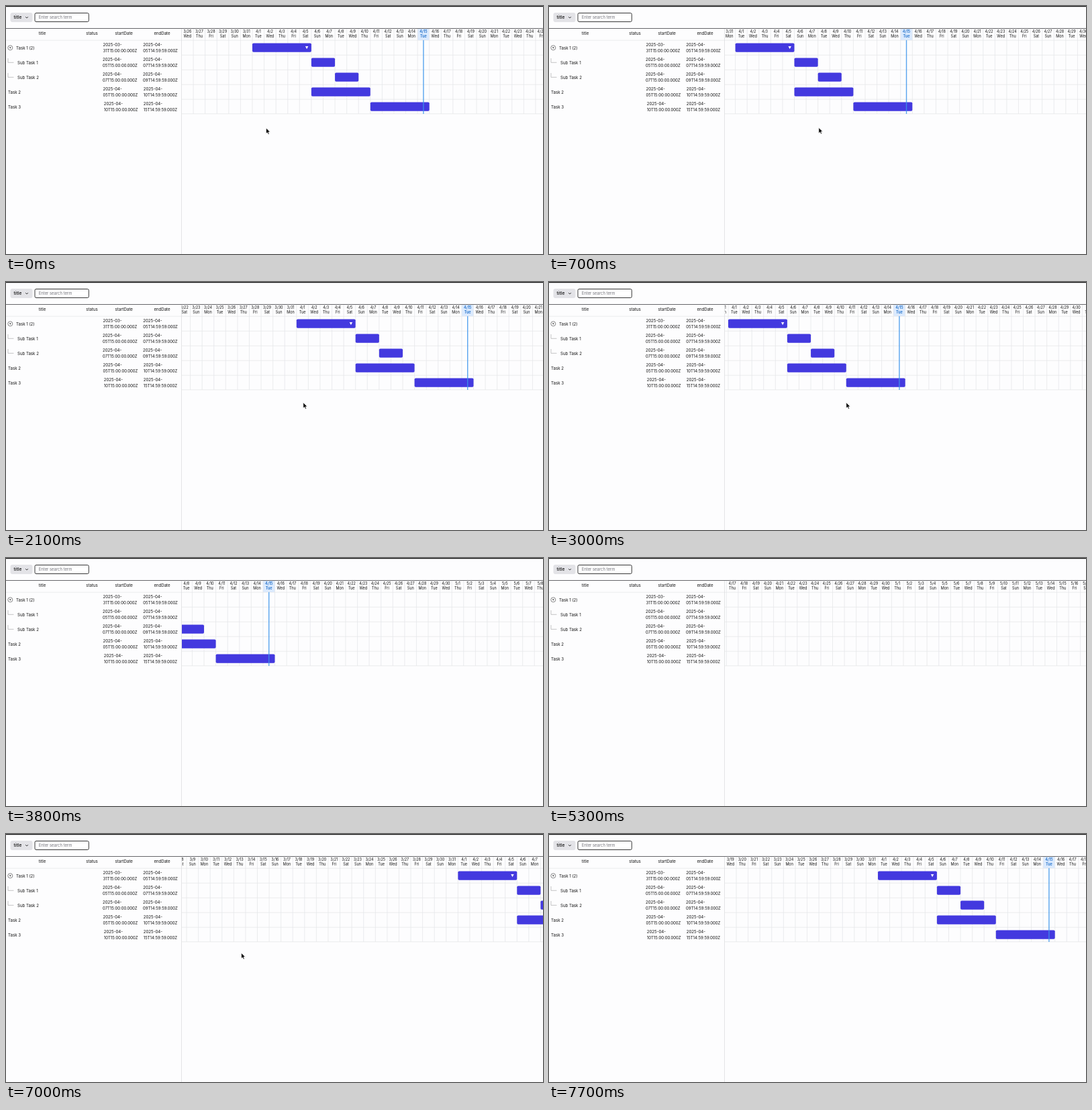
These frames come from a looping animation (800x370 px, 8 s). An HTML page:

```html
<!DOCTYPE html>
<html lang="en">
<head>
<meta charset="utf-8">
<title>Gantt chart scrolling</title>
<style>
  html, body { margin: 0; width: 100%; height: 100%; overflow: hidden; background: #fdfdfe; }
  svg { display: block; width: 800px; height: 370px; }
  text { font-family: Inter, "Liberation Sans", sans-serif; font-size: 6.1px; fill: #111; }
  .mid { text-anchor: middle; }
  .day text { font-size: 5.5px; text-anchor: middle; }
  .day.today text { fill: #1f6fc9; font-weight: 600; }
  .day rect { fill: none; }
  .day.today rect { fill: #dbeafe; }
  .grid { stroke: #e6e7ea; stroke-width: .8; fill: none; }
</style>
</head>
<body>
<svg id="stage" viewBox="0 0 800 370">
  <defs><clipPath id="pane"><rect x="262" y="34" width="538" height="336"/></clipPath></defs>
  <rect width="800" height="370" fill="#fdfdfe"/>
  <g id="toolbar">
    <rect x="6.5" y="10" width="33" height="14" rx="3" fill="#e3e3e7"/>
    <text x="11.6" y="19.3" style="font-size:6.6px;font-weight:500">title</text>
    <path d="M29 16l2 2 2-2" fill="none" stroke="#333" stroke-width=".9"/>
    <rect x="43" y="10.5" width="80.3" height="13" rx="2" fill="#fff" stroke="#222" stroke-width=".9"/>
    <text x="48.8" y="19.2" style="fill:#707078;font-size:5.9px">Enter search term</text>
  </g>
  <g id="table"></g>
  <g id="chart" clip-path="url(#pane)">
    <g id="days"></g>
    <path class="grid" d="M262 51.2H800M262 73.2H800M262 95.2H800M262 117.2H800M262 139.2H800M262 160.8H800"/>
    <g id="bars"></g>
  </g>
  <path d="M261.5 34V370" stroke="#dcdde0" stroke-width=".8"/>
  <path d="M0 33.5H800" stroke="#55555a" stroke-width=".9"/>
  <rect width="800" height="1.2" fill="#111"/>
  <path id="cursor" d="M0 0V8.4L1.9 6.7L3.2 9.6L4.7 8.9L3.4 6.1H6Z" fill="#000" stroke="#fff" stroke-width=".7"/>
</svg>
<script>
const NS = "http://www.w3.org/2000/svg";
const LOOP = 8000, STEP = 100;
const DAY_W = 17.58, ROW_H = 22, TOP = 51, LEFT = 262;
const TODAY = 14; // days after April 1
const $ = id => document.getElementById(id);

function add(parent, tag, attrs = {}, content = "") {
  const node = document.createElementNS(NS, tag);
  for (const key in attrs) node.setAttribute(key, attrs[key]);
  node.textContent = content;
  parent.appendChild(node);
  return node;
}

// start and length are in days, counted from April 1
const tasks = [
  { name: "Task 1 (2)", x: 15, from: "03-31", to: "04-05", cells: [144.5, 204.3], start: 0, length: 5, group: true },
  { name: "Sub Task 1", x: 17, from: "04-05", to: "04-07", cells: [144, 204.3], start: 5, length: 2, child: true },
  { name: "Sub Task 2", x: 17, from: "04-07", to: "04-09", cells: [144, 204], start: 7, length: 2, child: true },
  { name: "Task 2", x: 3, from: "04-05", to: "04-10", cells: [144.5, 204.8], start: 5, length: 5 },
  { name: "Task 3", x: 3, from: "04-10", to: "04-15", cells: [145.8, 204.8], start: 10, length: 5 }
];

function buildTable() {
  const table = $("table");
  const heads = { title: 54, status: 128, startDate: 175.7, endDate: 232.5 };
  for (const name in heads) add(table, "text", { x: heads[name], y: 43.3, class: "mid" }, name);
  add(table, "path", { d: "M0 51.2H262", class: "grid" });

  tasks.forEach((task, row) => {
    const y = TOP + row * ROW_H;
    add(table, "text", { x: task.x, y: y + 13.8 }, task.name);
    const stamp = (x, date, time) => {
      const [month, day] = date.split("-");
      add(table, "text", { x, y: y + 9.4 }, `2025-${month}-`);
      add(table, "text", { x, y: y + 17.9, style: "font-size:5.95px" }, `${day}T${time}Z`);
    };
    stamp(task.cells[0], task.from, "15:00:00.000");
    stamp(task.cells[1], task.to, "14:59:59.000");
    if (task.group) {
      add(table, "circle", { cx: 6.3, cy: y + 11.3, r: 3.5, fill: "none", stroke: "#555", "stroke-width": .7 });
      add(table, "path", { d: `M4.8 ${y + 10.6}h3l-1.5 1.8z`, fill: "#333" });
    }
    if (task.child) {
      add(table, "path", { d: `M3 ${y + 5}V${y + 11.3}H11.5`, fill: "none", stroke: "#b5b5b8", "stroke-width": .8 });
    }
  });
}

function buildBars() {
  const bars = $("bars");
  tasks.forEach((task, row) => {
    const y = TOP + row * ROW_H + 4.5, end = (task.start + task.length) * DAY_W;
    add(bars, "rect", { x: task.start * DAY_W, y, width: task.length * DAY_W, height: 13.2, rx: 1.8, fill: "#4339df" });
    if (task.group) add(bars, "path", { d: `M${end - 9} ${y + 4.4}h4.4l-2.2 4.4z`, fill: "#fff" });
  });
  const x = (TODAY + .5) * DAY_W;
  add(bars, "path", { d: `M${x} 51V161`, stroke: "#3b94ec", "stroke-width": 1.4, opacity: .85 });
}

const columns = [];
function buildColumns() {
  for (let i = 0; i < 32; i++) {
    const node = add($("days"), "g", { class: "day" });
    add(node, "rect", { y: 34, width: DAY_W, height: 17 });
    add(node, "path", { d: "M0 34V161", class: "grid" });
    const date = add(node, "text", { x: DAY_W / 2, y: 40.3 });
    const weekday = add(node, "text", { x: DAY_W / 2, y: 47.3 });
    columns.push({ node, date, weekday });
  }
}

// [time, x of April 1, speed in px/ms]
const scroll = [
  [0, 367, 0], [1400, 188.2, 0], [2100, 432.8, 0], [3000, 267, -.15],
  [5300, -17, 0], [6100, 940.8, 0], [7700, 490, 0]
];
function scrollAt(t) {
  const last = scroll[scroll.length - 1];
  if (t >= last[0]) return last[1];
  const i = scroll.findIndex(key => key[0] > t);
  const [t0, x0, v0] = scroll[i - 1], [t1, x1, v1] = scroll[i];
  const d = t1 - t0, u = (t - t0) / d, ease = u * u * (3 - 2 * u);
  return x0 + (x1 - x0) * ease + d * u * (1 - u) * (v0 * (1 - u) - v1 * u);
}

// [time, x, y]; the pointer is hidden in the gap between the paths
const pointerPaths = [
  [[0, 387.5, 182], [400, 387.5, 182], [1300, 442.8, 179.8], [3000, 442.8, 179.8], [3500, 436, 172]],
  [[5500, 340.5, 104.2], [6300, 340.5, 104.2], [7200, 352, 188], [7600, 360, 270]]
];
function pointerAt(t) {
  const path = pointerPaths.find(p => t >= p[0][0] && t <= p[p.length - 1][0]);
  if (!path) return null;
  const i = Math.max(1, path.findIndex(key => key[0] >= t));
  const [t0, x0, y0] = path[i - 1], [t1, x1, y1] = path[i];
  const u = (t - t0) / (t1 - t0), ease = u * u * (3 - 2 * u);
  return [x0 + (x1 - x0) * ease, y0 + (y1 - y0) * ease];
}

function render(t) {
  const origin = scrollAt(t);
  const first = Math.floor((LEFT - origin) / DAY_W);
  columns.forEach(({ node, date, weekday }, i) => {
    const day = first + i, when = new Date(Date.UTC(2025, 3, 1 + day));
    node.setAttribute("transform", `translate(${origin + day * DAY_W} 0)`);
    node.setAttribute("class", day === TODAY ? "day today" : "day");
    date.textContent = `${when.getUTCMonth() + 1}/${when.getUTCDate()}`;
    weekday.textContent = ["Sun", "Mon", "Tue", "Wed", "Thu", "Fri", "Sat"][when.getUTCDay()];
  });
  $("bars").setAttribute("transform", `translate(${origin} 0)`);

  const pointer = pointerAt(t);
  $("cursor").setAttribute("visibility", pointer ? "visible" : "hidden");
  if (pointer) $("cursor").setAttribute("transform", `translate(${pointer})`);
}

buildTable();
buildColumns();
buildBars();
render(0);

const began = performance.now();
function tick() {
  const t = (performance.now() - began) % LOOP;
  render(Math.floor(t / STEP) * STEP);
  requestAnimationFrame(tick);
}
requestAnimationFrame(tick);
</script>
</body>
</html>
```
